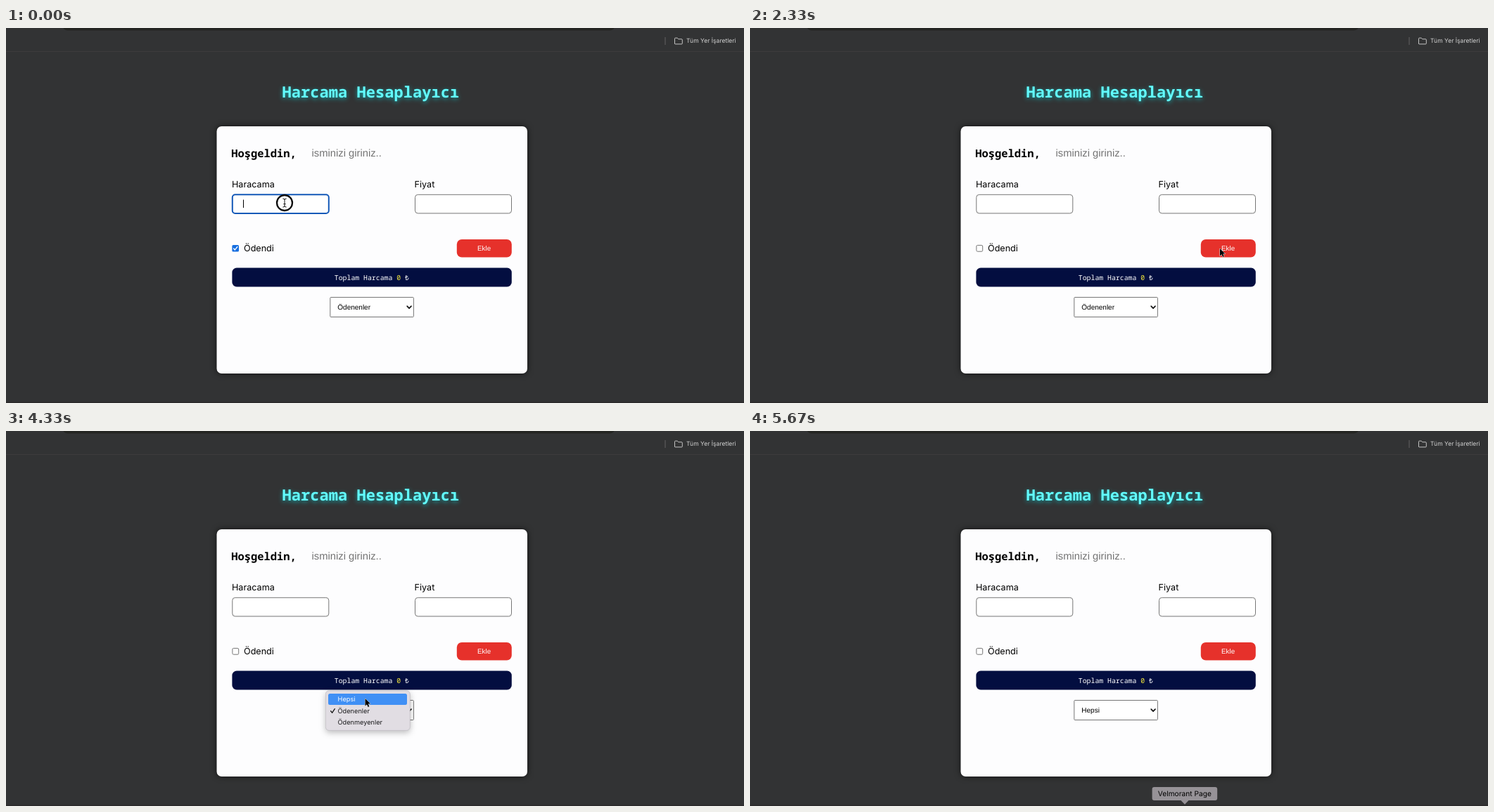
Write an HTML page that moves like this. It is 1049 px wide and 534 px high and loops after 5840 ms.

```html
<!DOCTYPE html>
<html lang="tr">
<head>
<meta charset="utf-8">
<title>Harcama Hesaplayıcı</title>
<style>
html, body { margin: 0; width: 100%; height: 100%; overflow: hidden; background: #323334; }
svg { display: block; width: 1049px; height: 534px; text-rendering: geometricPrecision; }
.mono { font-family: "Noto Sans Mono", monospace; white-space: pre; }
.label { font: 12.6px Inter, sans-serif; }
.arial { font-family: "Liberation Sans", Arial, sans-serif; }
.menu { font: 9.2px Inter, sans-serif; }
.title {
  font-size: 22px; font-weight: 700; letter-spacing: .05px; fill: #62fbfd;
  filter: drop-shadow(0 2px 3px rgba(0, 240, 245, .55));
}
.card { fill: #fdfdfe; filter: drop-shadow(0 0 4px rgba(0, 0, 0, .65)); }
.panel { fill: #e1dde3; stroke: #b8b4ba; stroke-width: .6; filter: drop-shadow(0 3px 4px rgba(0, 0, 0, .25)); }
.field { fill: #fff; stroke: #767676; stroke-width: 1; }
.field.focus { stroke: #1459b8; stroke-width: 2; }
.line { fill: none; stroke-linecap: round; stroke-linejoin: round; }
</style>
</head>
<body>
<svg viewBox="0 0 1049 534">
  <rect width="1049" height="534" fill="#323334"/>
  <rect y="33" width="1049" height="1" fill="#3d3c3c"/>
  <rect y="532.5" width="1049" height="1.5" fill="#2b2b2b"/>
  <rect x="80" y="-20" width="786" height="23.5" rx="8" fill="#242522"/>
  <rect x="936.5" y="13" width="1" height="11" fill="#626262"/>
  <path class="line" d="M950.5 22V15.2q0-1 1-1h2.8l1.4 1.6h4.6q1 0 1 1V22q0 .9-1 .9h-8.8q-1 0-1-.9z" stroke="#c4c4c4"/>
  <text x="967" y="21.4" font-family="Inter, sans-serif" font-size="8.55" fill="#d2d2d2">Tüm Yer İşaretleri</text>

  <text class="mono title" x="392.6" y="99">Harcama Hesaplayıcı</text>

  <rect class="card" x="299.5" y="140" width="441.5" height="352" rx="7"/>
  <text class="mono" x="320.3" y="183.8" font-size="15.4" font-weight="700">Hoşgeldin,</text>
  <text class="arial" x="434.6" y="182.6" font-size="14.75" fill="#747474">isminizi giriniz..</text>

  <text class="label" x="321" y="227">Haracama</text>
  <text class="label" x="580.6" y="227">Fiyat</text>
  <rect id="expense" class="field" x="321.8" y="237.3" width="137" height="26.6" rx="4"/>
  <rect class="field" x="581.5" y="237.3" width="137" height="26.6" rx="4"/>
  <rect id="caret" x="337" y="244.5" width="1" height="11.5"/>

  <rect id="unpaid" class="field" x="321.9" y="309.4" width="8.8" height="8.8" rx="1.6"/>
  <g id="paid">
    <rect x="321.4" y="309" width="9.6" height="9.6" rx="1.6" fill="#176fe0"/>
    <path class="line" d="M323.6 314l1.8 1.9 3.5-4.4" stroke="#fff" stroke-width="1.4"/>
  </g>
  <text class="label" x="338" y="318.2">Ödendi</text>

  <rect x="640.8" y="301" width="78" height="25.6" rx="7" fill="#e6312b"/>
  <text class="arial" x="679.6" y="317.2" font-size="9.8" fill="#fff" text-anchor="middle">Ekle</text>

  <rect x="321.4" y="341.5" width="397.4" height="27" rx="6.5" fill="#030e40"/>
  <text class="mono" x="466.8" y="358.8" font-size="9.83" font-weight="500" fill="#fff">Toplam Harcama <tspan fill="#f5e83c">0</tspan> ₺</text>

  <rect id="select" class="field" x="460.8" y="383.5" width="118.6" height="28" rx="1"/>
  <text id="choice" class="arial" x="471.3" y="401" font-size="10"></text>
  <path class="line" d="M570.2 396.2l2.9 2.9 2.9-2.9" stroke="#111" stroke-width="1.7"/>

  <g id="menu">
    <rect class="panel" x="454.3" y="369.8" width="120" height="56.6" rx="5"/>
    <rect id="highlight" x="458" width="112" height="16" rx="2.5" fill="#4090f5"/>
    <path id="tick" class="line" d="M461.6 398.8l2.1 2.4 3.6-5.6" stroke-width="1.3"/>
    <g id="options"></g>
  </g>

  <g id="tip">
    <path d="M612 525.5h12l-6 6.3z" fill="#969297"/>
    <rect x="571.6" y="507" width="92.6" height="19" rx="3" fill="#969297"/>
    <text x="617.8" y="520.3" font-family="Inter, sans-serif" font-size="10.2" text-anchor="middle">Velmorant Page</text>
  </g>

  <g id="cursor">
    <path id="arrow" d="M0 0V10.6L2.5 8.3 4.1 12 5.8 11.2 4.2 7.6H7.5z" stroke="#fff" stroke-width="1"
      paint-order="stroke" style="filter: drop-shadow(0 .7px .7px rgba(0, 0, 0, .35))"/>
    <path id="beam" class="line" d="M-2.2 -6Q0 -6 0 -4.6 0 -6 2.2 -6M0 -4.8V4.8M-2.2 6Q0 6 0 4.6 0 6 2.2 6M-1.2 1.6h2.4" stroke="#111"/>
    <circle id="ring" fill="none" stroke="#0b0b0b" stroke-width="2.3"/>
  </g>
</svg>
<script>
const LOOP = 5840, STEP = 1000 / 6, LAST = 34;
const $ = id => document.getElementById(id);
const show = (id, on) => $(id).setAttribute('visibility', on ? 'visible' : 'hidden');

// step, x, y
const path = [
  [0, 396, 249], [1, 396, 249], [4, 350, 288], [6, 327, 314], [7, 327, 314],
  [9, 354, 312], [14, 668, 314], [16, 670, 314], [18, 622.5, 307.5],
  [22, 536, 403.5], [24, 536, 403.5], [26, 510.5, 381], [28, 510.5, 381],
  [30, 536.8, 440], [33, 614, 538], [34, 618, 550]
];
// step: click ring radius
const rings = { 0: 11, 1: 15, 6: 11, 7: 15, 22: 11, 23: 15, 27: 11, 28: 15 };

const options = ['Hepsi', 'Ödenenler', 'Ödenmeyenler'].map((name, i) => {
  const el = document.createElementNS('http://www.w3.org/2000/svg', 'text');
  el.textContent = name;
  el.setAttribute('class', 'menu');
  el.setAttribute('x', 471.6);
  el.setAttribute('y', 385.4 + i * 16.2);
  $('options').append(el);
  return el;
});

function position(n) {
  const i = Math.max(1, path.findIndex(p => p[0] >= n));
  const [a, x0, y0] = path[i - 1], [b, x1, y1] = path[i];
  const u = (n - a) / (b - a), e = u * u * (3 - 2 * u);
  return [x0 + (x1 - x0) * e, y0 + (y1 - y0) * e];
}

function draw(n) {
  const [x, y] = position(n);
  const typing = n < 7, chosen = n >= 29, open = n >= 24 && !chosen;
  const overInput = x > 321 && x < 459 && y > 237 && y < 264;

  $('expense').classList.toggle('focus', typing);
  show('caret', typing && n % 6 < 3);
  show('paid', n < 7);
  show('unpaid', n >= 7);

  $('choice').textContent = chosen ? 'Hepsi' : 'Ödenenler';
  $('select').classList.toggle('focus', chosen && n < 33);
  show('menu', open);
  const active = y < 390 ? 0 : 1;
  $('highlight').setAttribute('y', 374 + active * 16.2);
  $('tick').setAttribute('stroke', active === 1 ? '#fff' : '#1a1a1a');
  options.forEach((el, i) => el.setAttribute('fill', i === active ? '#fff' : '#1c1c1e'));

  show('tip', n >= 33);
  $('cursor').setAttribute('transform', `translate(${x} ${y})`);
  show('arrow', !overInput);
  show('beam', overInput);
  $('ring').setAttribute('r', rings[n] || 0);
  show('ring', n in rings);
}

let shown = -1;
const start = performance.now();
function tick(now) {
  const t = Math.max(0, now - start) % LOOP;
  const n = Math.min(LAST, Math.floor((t + 4) / STEP));
  if (n !== shown) draw(shown = n);
  requestAnimationFrame(tick);
}
draw(0);
requestAnimationFrame(tick);
</script>
</body>
</html>
```
